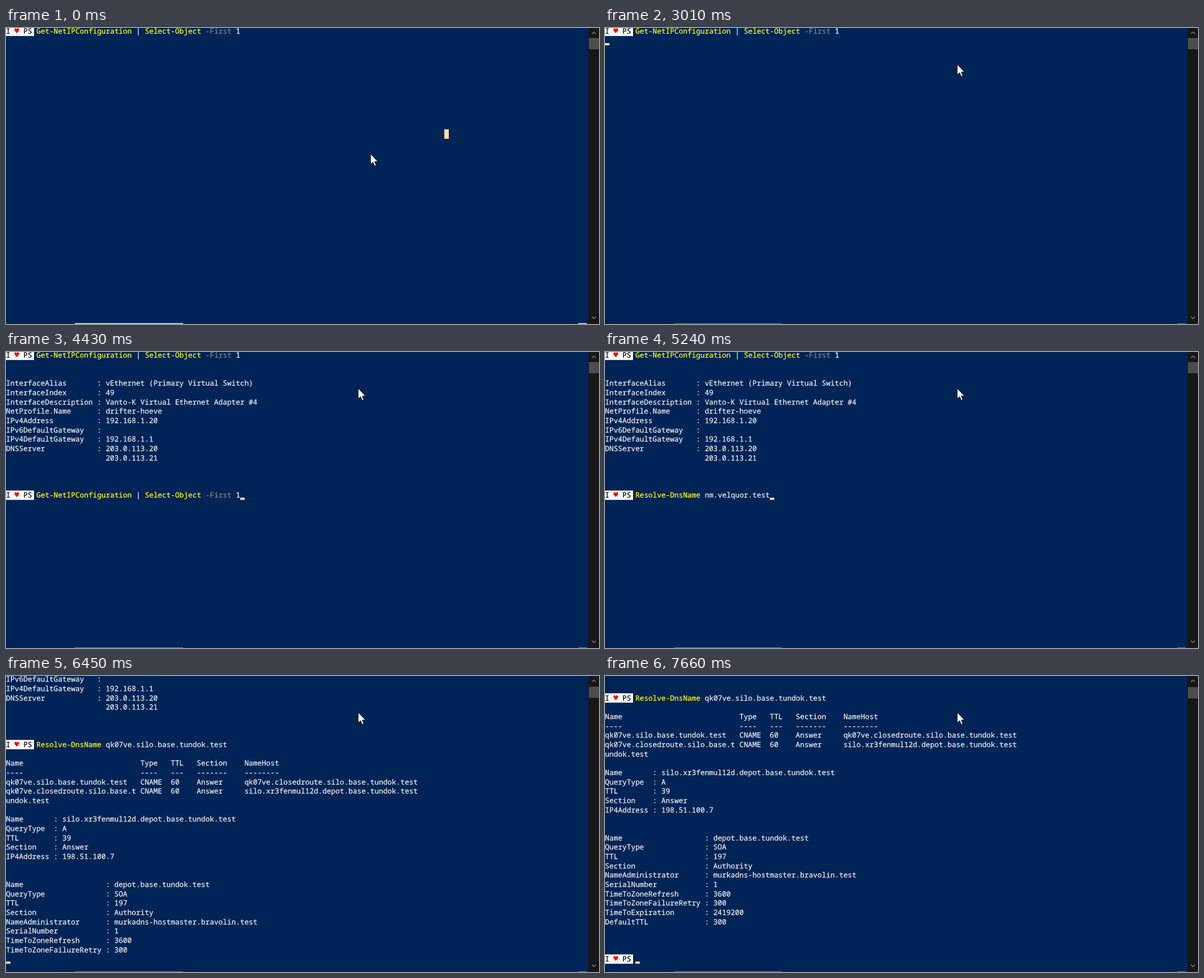
Animation, 1058 px wide and 529 px high, one loop 8 s. Source, as an HTML page:

```html
<!DOCTYPE html>
<html lang="en">
<head>
<meta charset="utf-8">
<title>Terminal session</title>
<style>
  html, body { margin: 0; width: 100%; height: 100%; overflow: hidden; background: #012456; }
  svg { display: block; width: 1058px; height: 529px; }
  text {
    font: 12.9px "Noto Sans Mono", "DejaVu Sans Mono", monospace;
    white-space: pre;
    text-rendering: geometricPrecision;
    font-variant-ligatures: none;
    stroke-width: .25px;
  }
  text.heart { font: 14px "DejaVu Sans Mono", monospace; }
</style>
</head>
<body>
<svg viewBox="0 0 1058 529">
  <rect width="1058" height="529" fill="#012456"/>
  <rect y="528" width="1039" height="1" fill="#17202f"/>
  <g id="edge"></g>
  <g id="screen"></g>
  <rect id="mark" x="782" y="181" width="8" height="17" fill="#fedba9"/>
  <rect id="cursor" width="7.9" height="4" fill="#fedba9"/>
  <rect x="1039" width="19" height="529" fill="#171717"/>
  <rect id="thumb" x="1040" width="18" height="20" fill="#4d4d4d"/>
  <path d="M1045.5 10.5l3.5 -3.5l3.5 3.5M1045.5 516l3.5 3.5l3.5 -3.5" fill="none" stroke="#8c8c8c" stroke-width="1.2"/>
  <path id="mouse" d="M.5 1.2V19.6L4.7 15.7L7.6 22.4L10.3 21.2L7.5 14.7H13.3Z" fill="#fff" stroke="#000" stroke-opacity=".8" stroke-width=".9"/>
</svg>
<script>
const NS = 'http://www.w3.org/2000/svg';
const LOOP = 8000, CW = 7.74, RH = 16.667, CMD_ROW = 15, ROWS = 32;
// Offsets of the cell top, text baseline and cursor within row 0
const CELL = -2.4, BASE = 10.4, CARET = 10.3;
const INK = '#eeedf0', YELLOW = '#ffff00', GREY = '#848484';
const $ = id => document.getElementById(id);

function add(parent, tag, attrs, text) {
  const el = document.createElementNS(NS, tag);
  for (const k in attrs) el.setAttribute(k, attrs[k]);
  if (text) el.textContent = text;
  parent.append(el);
  return el;
}

// Commands are lists of [column, text, colour]
const getConfig = [
  [7, 'Get-NetIPConfiguration', YELLOW], [30, '|', INK],
  [32, 'Select-Object', YELLOW], [46, '-First', GREY], [53, '1', '#fff']
];
const resolve = host => [[7, 'Resolve-DnsName', YELLOW], [23, host, INK]];

const zone = 'base.tundok.test';
const host = 'qk07ve.silo.' + zone;
const link = 'qk07ve.closedroute.silo.' + zone;
const node = 'silo.xr3fenmul12d.depot.' + zone;

const lines = {};
const put = (row, ...list) => list.forEach((s, i) => lines[row + i] = s);
const pairs = (width, list) => list.map(([k, v]) => k.padEnd(width) + (k ? ': ' : '  ') + v);
const cells = (a, b, c, d, e) => a.padEnd(31) + b.padEnd(7) + c.padEnd(6) + d.padEnd(11) + e;

put(3, ...pairs(21, [
  ['InterfaceAlias', 'vEthernet (Primary Virtual Switch)'],
  ['InterfaceIndex', '49'],
  ['InterfaceDescription', 'Vanto-K Virtual Ethernet Adapter #4'],
  ['NetProfile.Name', 'drifter-hoeve'],
  ['IPv4Address', '192.168.1.20'],
  ['IPv6DefaultGateway', ''],
  ['IPv4DefaultGateway', '192.168.1.1'],
  ['DNSServer', '203.0.113.20'],
  ['', '203.0.113.21']
]));
put(17,
  cells('Name', 'Type', 'TTL', 'Section', 'NameHost'),
  cells('----', '----', '---', '-------', '--------'),
  cells(host, 'CNAME', '60', 'Answer', link),
  cells(link.slice(0, 30), 'CNAME', '60', 'Answer', node),
  link.slice(30));
put(23, ...pairs(11, [
  ['Name', node], ['QueryType', 'A'], ['TTL', '39'],
  ['Section', 'Answer'], ['IP4Address', '198.51.100.7']
]));
put(30, ...pairs(23, [
  ['Name', 'depot.' + zone], ['QueryType', 'SOA'], ['TTL', '197'],
  ['Section', 'Authority'],
  ['NameAdministrator', 'murkadns-hostmaster.bravolin.test'],
  ['SerialNumber', '1'], ['TimeToZoneRefresh', '3600'],
  ['TimeToZoneFailureRetry', '300'], ['TimeToExpiration', '2419200'],
  ['DefaultTTL', '300']
]));

// Each step changes only the fields it names; cursor is [column, screen row]
const steps = [
  { t: 0, mouse: [650, 224], mark: true, lit: true, cursor: null, last: 0, top: 0, thumb: 18, cmd: [] },
  { t: 200, mouse: [591, 58] },
  { t: 370, mouse: [578, 41], lit: false },
  { t: 580, mouse: [628, 64] },
  { t: 980, cursor: [54, 0] },
  { t: 1380, cursor: null, mark: false },
  { t: 1990, cursor: [54, 0] },
  { t: 2390, cursor: null },
  { t: 3010, cursor: [0, 1] },
  { t: 3410, cursor: null, last: 15 },
  { t: 4020, cursor: [7, 15] },
  { t: 4430, cursor: [54, 15], cmd: getConfig },
  { t: 4620, cursor: null },
  { t: 4840, cmd: [[7, 'res', YELLOW]] },
  { t: 5030, cursor: [10, 15] },
  { t: 5240, cursor: [38, 15], cmd: resolve('nm.velquor.test') },
  { t: 5660, cursor: [51, 15], cmd: resolve(host) },
  { t: 6250, cursor: null },
  { t: 6450, cursor: [0, 30], last: 37, top: 8, thumb: 19 },
  { t: 6650, cursor: [7, 30], last: 43, top: 13, thumb: 20 },
  { t: 7290, cursor: null },
  { t: 7660, cursor: [7, 30] }
];
for (let i = 1; i < steps.length; i++) steps[i] = { ...steps[i - 1], ...steps[i] };

function write(row, col, text, fill, cls = '') {
  const y = Math.round(BASE + row * RH);
  add($('screen'), 'text', { x: col * CW, y, fill, stroke: fill, class: cls }, text);
}

function prompt(row, cmd) {
  add($('screen'), 'rect', { y: CELL + row * RH, width: 50, height: RH, fill: '#fff' });
  write(row, 0, 'I', '#000');
  write(row, 1.93, '♥', '#f00', 'heart');
  write(row, 4, 'PS', '#000');
  for (const [col, text, fill] of cmd) write(row, col, text, fill);
}

function drawScreen(s) {
  $('screen').replaceChildren();
  const prompts = { 0: getConfig, [CMD_ROW]: s.cmd, 43: [] };
  for (let r = s.top; r <= Math.min(s.last, s.top + ROWS); r++) {
    if (prompts[r]) prompt(r - s.top, prompts[r]);
    else if (lines[r]) write(r - s.top, 0, lines[r], INK);
  }
}

function drawEdge(lit) {
  $('edge').replaceChildren();
  for (const [x, width] of [[123, 193], [1021, 15]])
    add($('edge'), 'rect', lit
      ? { x, y: 527.5, width, height: 1.5, fill: '#e6ebf3' }
      : { x, y: 528, width, height: 1, fill: '#7d8697' });
}

function show(s) {
  drawScreen(s);
  drawEdge(s.lit);
  $('mark').style.display = s.mark ? '' : 'none';
  $('cursor').style.display = s.cursor ? '' : 'none';
  if (s.cursor) {
    $('cursor').setAttribute('x', s.cursor[0] * CW);
    $('cursor').setAttribute('y', CARET + s.cursor[1] * RH);
  }
  $('thumb').setAttribute('y', s.thumb);
  $('mouse').setAttribute('transform', `translate(${s.mouse})`);
}

let current = null;
const start = performance.now();
function tick() {
  const t = (performance.now() - start) % LOOP;
  const step = steps.findLast(s => s.t <= t);
  if (step !== current) show(current = step);
  requestAnimationFrame(tick);
}
tick();
</script>
</body>
</html>
```
